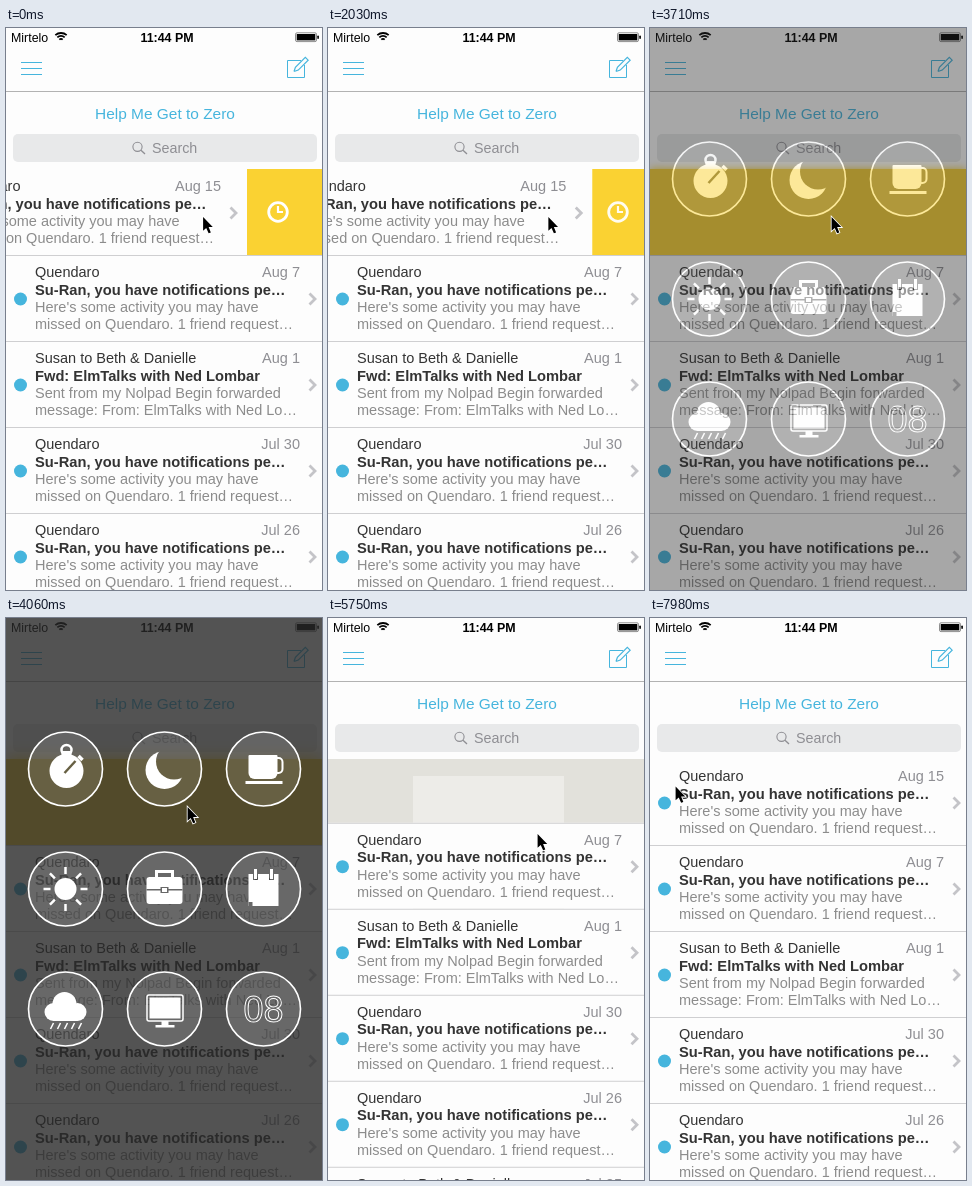
These frames come from a looping animation (316 px wide and 562 px high, 8000 ms). An HTML page with a canvas:

```html
<!DOCTYPE html>
<html lang="en">
<head>
<meta charset="utf-8">
<title>Mail inbox</title>
<style>
html, body { margin: 0; width: 100%; height: 100%; overflow: hidden; background: #fdfdfd; }
canvas { display: block; width: 316px; height: 562px; }
</style>
</head>
<body>
<canvas id="stage"></canvas>
<script>
const W = 316, H = 562, LOOP = 8000, STEP = 88.5;
const TOP = 141, ROW = 86, CELL = 320;
const BLUE = '#46b5dd', YELLOW = '#fad232', PAPER = '#fdfdfd', GRAY = '#8e8e93', WHITE = '#fff';
const FONT = '"Liberation Sans", Arial, sans-serif';
const dpr = window.devicePixelRatio || 1;

function prepare(canvas) {
  canvas.width = W * dpr;
  canvas.height = H * dpr;
  const c = canvas.getContext('2d');
  c.scale(dpr, dpr);
  return c;
}
const ctx = prepare(document.getElementById('stage'));

// ---- drawing helpers ----
function text(s, x, y, size, color, weight = '', align = 'left') {
  ctx.font = `${weight} ${size}px ${FONT}`;
  ctx.fillStyle = color;
  ctx.textAlign = align;
  ctx.fillText(s, x, y);
}
function line(c, pts, color, width) {
  c.beginPath();
  pts.forEach(p => c.lineTo(...p));
  c.strokeStyle = color;
  c.lineWidth = width;
  c.stroke();
}
function box(c, x, y, w, h, color, r = 0) {
  c.beginPath();
  c.roundRect(x, y, w, h, r);
  c.fillStyle = color;
  c.fill();
}
function frame(c, x, y, w, h, color, width, r = 0) {
  c.beginPath();
  c.roundRect(x, y, w, h, r);
  c.strokeStyle = color;
  c.lineWidth = width;
  c.stroke();
}
const disc = (c, x, y, r, color) => box(c, x - r, y - r, 2 * r, 2 * r, color, r);
const ring = (c, x, y, r, color, width) => frame(c, x - r, y - r, 2 * r, 2 * r, color, width, r);

// Eased progress from 0 to 1 while k runs from a to b
function ramp(k, a, b) {
  const p = Math.min(1, Math.max(0, (k - a) / (b - a)));
  return p * p * (3 - 2 * p);
}

// ---- messages ----
const notice = date => ({
  from: 'Quendaro', date,
  subject: 'Su-Ran, you have notifications pe…',
  body: ["Here's some activity you may have", 'missed on Quendaro. 1 friend request…']
});
const forward = date => ({
  from: 'Susan to Beth & Danielle', date,
  subject: 'Fwd: ElmTalks with Ned Lombar',
  body: ['Sent from my Nolpad Begin forwarded', 'message: From: ElmTalks with Ned Lo…']
});
const first = notice('Aug 15');
const feed = [notice('Aug 7'), forward('Aug 1'), notice('Jul 30'), notice('Jul 26'), forward('Jul 25')];

function message(m, x, y) {
  ctx.save();
  ctx.translate(x, y);
  box(ctx, 0, 0, CELL, ROW, PAPER);
  disc(ctx, 14.5, 44, 6.5, BLUE);
  text(m.from, 29, 22, 14.5, '#333');
  text(m.date, 294, 22, 14.5, GRAY, '', 'right');
  text(m.subject, 29, 39.5, 14.7, '#333', 'bold');
  m.body.forEach((s, i) => text(s, 29, 57 + 17 * i, 14.5, '#8c8c8c'));
  line(ctx, [[303.5, 38.5], [309, 44], [303.5, 49.5]], '#c4c4c8', 2.8);
  ctx.restore();
}

function header() {
  const c = ctx;
  text('Mirtelo', 5, 13.5, 12.4, '#000');
  text('11:44 PM', 161, 13.5, 12.4, '#000', 'bold', 'center');
  for (let r = 2.5; r < 9; r += 3) {
    c.beginPath();
    c.arc(55, 13.5, r, -2.3, -0.84);
    c.strokeStyle = '#000';
    c.lineWidth = 1.8;
    c.stroke();
  }
  frame(c, 289.5, 4.8, 21, 8.8, '#444', 0.6, 1.5);
  box(c, 290.7, 6, 18.6, 6.4, '#000');
  box(c, 311.3, 7.5, 1.6, 3.5, '#000', 1);

  for (let i = 0; i < 3; i++) box(c, 15, 34 + 6 * i, 21, 1, BLUE);
  line(c, [[295, 32.5], [281.5, 32.5], [281.5, 49.5], [298.5, 49.5], [298.5, 37]], BLUE, 1);
  c.save();
  c.translate(288, 43.5);
  c.rotate(-Math.PI / 4);
  line(c, [[0, 0], [4, -2], [18, -2], [18, 2], [4, 2], [0, 0]], BLUE, 1.2);
  c.restore();
  box(c, 0, 63, W, 1, '#b2b2b2');

  text('Help Me Get to Zero', 159, 91, 15.45, BLUE, '', 'center');
  box(c, 7, 106, 304, 28, '#e8e9ea', 5);
  ring(c, 131.5, 118.8, 4.6, GRAY, 1.1);
  line(c, [[135, 122.2], [139, 126]], GRAY, 1.3);
  text('Search', 146, 125, 14.3, GRAY);
}

// ---- snooze menu, drawn once ----
const menu = document.createElement('canvas');
const m = prepare(menu);

function cut(draw) {
  m.globalCompositeOperation = 'destination-out';
  draw();
  m.globalCompositeOperation = 'source-over';
}
function stopwatch() {
  disc(m, 1, 2, 17, WHITE);
  ring(m, 1, -19, 5, WHITE, 2.5);
  box(m, -4, -18, 10, 4, WHITE);
  line(m, [[13, -13], [17, -9]], WHITE, 3.5);
  cut(() => line(m, [[-1, 4], [10, -8]], WHITE, 2.5));
}
function moon() {
  disc(m, 0, 1, 19, WHITE);
  cut(() => disc(m, 9.5, -7.5, 18, WHITE));
}
function cup() {
  box(m, -15, -14, 29, 24, WHITE, [1, 1, 6, 6]);
  frame(m, 10, -11, 9, 15, WHITE, 2, 4);
  box(m, -18, 12, 37, 3, WHITE);
}
function sun() {
  disc(m, 0, 0, 11, WHITE);
  for (let a = 0; a < 6; a += Math.PI / 4) {
    const at = r => [r * Math.cos(a), r * Math.sin(a)];
    line(m, [at(15), at(22)], WHITE, 2.5);
  }
}
function briefcase() {
  box(m, -18, -12, 36, 27, WHITE, 3);
  frame(m, -8, -17.5, 16, 8, WHITE, 3);
  cut(() => {
    box(m, -18, 0, 36, 1.5, WHITE);
    box(m, -4, -2, 8, 6, WHITE);
  });
  box(m, -2.5, -1, 5, 4, WHITE);
}
function calendar() {
  box(m, -15, -15, 30, 32, WHITE);
  for (const x of [-8, 8]) {
    cut(() => box(m, x - 2.5, -16, 5, 7, WHITE));
    box(m, x - 1.5, -20, 3, 10, WHITE);
  }
  cut(() => box(m, -15, 13, 4, 4, WHITE));
}
function cloud() {
  disc(m, -12, 3, 9, WHITE);
  disc(m, -1, -5, 12, WHITE);
  disc(m, 12, 3, 9, WHITE);
  box(m, -12, 0, 24, 12, WHITE);
  for (let x = -12; x <= 16; x += 7) line(m, [[x, 14], [x - 3, 20]], WHITE, 1.5);
}
function monitor() {
  frame(m, -17.5, -14, 36, 26, WHITE, 1.5, 2);
  box(m, -15, -11.5, 31, 21, WHITE);
  box(m, -3, 12, 7, 5, WHITE);
  box(m, -9, 16, 19, 2.5, WHITE);
}
function day() {
  m.font = `36px ${FONT}`;
  m.textAlign = 'center';
  m.strokeStyle = WHITE;
  m.lineWidth = 1;
  m.strokeText('08', 0, 13);
}
[stopwatch, moon, cup, sun, briefcase, calendar, cloud, monitor, day].forEach((draw, i) => {
  m.save();
  m.translate(59.5 + 99 * (i % 3), 151 + 120 * Math.floor(i / 3));
  draw();
  ring(m, 0, 0, 37, WHITE, 1.6);
  disc(m, 0, 0, 37, 'rgba(255,255,255,0.12)');
  m.restore();
});
m.globalCompositeOperation = 'destination-over';
box(m, 0, 0, W, H, 'rgba(40,40,40,0.8)');

function clock(x, alpha) {
  const y = 184;
  ctx.globalAlpha = alpha;
  ring(ctx, x, y, 9.3, WHITE, 2.8);
  line(ctx, [[x, y - 6], [x, y], [x + 5, y]], WHITE, 2.2);
  ctx.globalAlpha = 1;
}

function pointer(x, y) {
  const c = ctx;
  c.save();
  c.translate(x + 0.8, y);
  c.scale(0.92, 0.95);
  c.beginPath();
  [[0, 0], [0, 14.5], [3.4, 11.5], [6, 17.2], [8.4, 16.2], [6, 10.6], [10.5, 10.6]]
    .forEach(p => c.lineTo(...p));
  c.closePath();
  c.strokeStyle = WHITE;
  c.lineWidth = 1.8;
  c.stroke();
  c.fillStyle = '#000';
  c.fill();
  c.restore();
}

function pose(k) {
  const held = -79 - 19 * ramp(k, 0, 3) + 70 * ramp(k, 4, 13.5) - 66.5 * ramp(k, 19, 28);
  const away = ramp(k, 46, 49), nudge = ramp(k, 73, 74), sweep = ramp(k, 74, 76);
  return {
    dx: held - 270 * ramp(k, 36, 40),
    fade: ramp(k, 38, 46) - ramp(k, 52, 55),
    band: 1 - ramp(k, 52, 55),
    lift: ROW * (ramp(k, 64, 67) - ramp(k, 88, 90)),
    x: 275.3 + held + 28 * away - 6 * nudge - 103 * sweep - 90 * ramp(k, 79, 83) + 15 * ramp(k, 83, 85),
    y: 189 + 27 * away - 12 * nudge - 30 * sweep - 5.5 * ramp(k, 79, 85)
  };
}

function snoozed({ dx, band, fade }) {
  const edge = CELL + dx;
  ctx.globalAlpha = band;
  ctx.shadowColor = YELLOW;
  ctx.shadowBlur = 16 * fade * dpr;
  box(ctx, 0, TOP, W, ROW, YELLOW);
  ctx.shadowBlur = 0;
  ctx.globalAlpha = 1;
  if (edge > 0) {
    clock(Math.min(290, edge + 31), Math.min(1, -dx / 60));
    message(first, dx, TOP);
  }
}

function render(t) {
  const k = Math.floor((t + 20) / STEP), p = pose(k);

  box(ctx, 0, 0, W, H, PAPER);
  header();
  box(ctx, 0, TOP, W, ROW, '#e2e1db');
  box(ctx, 85, 158, 151, 151, '#edece8');
  if (k >= 88) message(first, 0, TOP);
  else if (p.band > 0) snoozed(p);
  feed.forEach((item, i) => {
    const y = TOP + ROW * (i + 1) - p.lift;
    message(item, 0, y);
    box(ctx, 0, y, W, 1, '#cfcfd1');
  });

  ctx.globalAlpha = p.fade;
  ctx.drawImage(menu, 0, 0, W, H);
  ctx.globalAlpha = 1;
  pointer(p.x, p.y);
}

const start = performance.now();
function loop() {
  render((performance.now() - start) % LOOP);
  requestAnimationFrame(loop);
}
loop();
</script>
</body>
</html>
```
